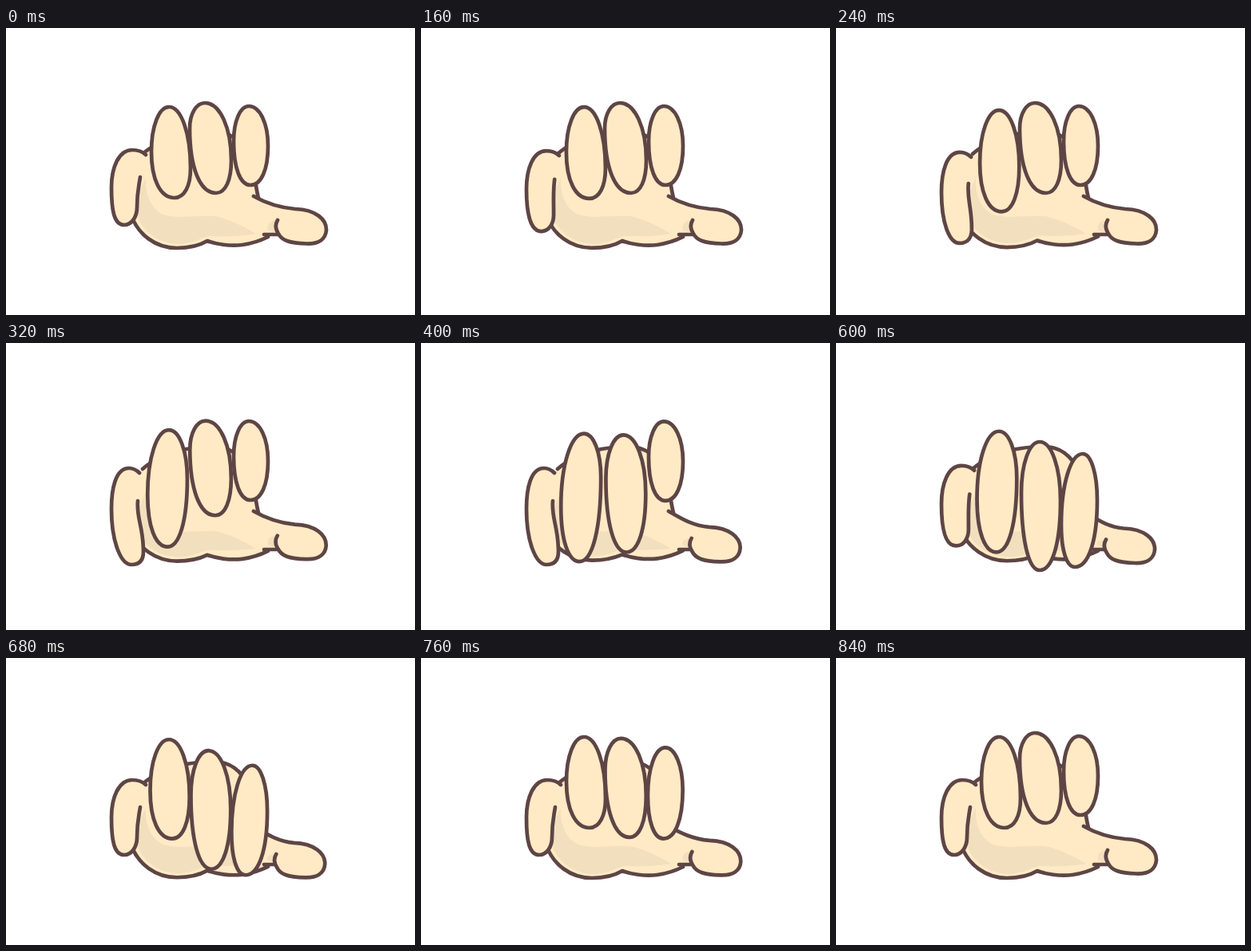
Animation of 512x360 px, one loop 880 ms. Source, as an HTML page:

```html
<!DOCTYPE html>
<html lang="en">
<head>
<meta charset="utf-8">
<title>Drumming fingers</title>
<style>
  html, body { margin: 0; width: 100%; height: 100%; overflow: hidden; background: #fff; }
  svg { display: block; width: 100vw; height: 100vh; }
  path { fill: none; stroke-width: 4.7; stroke-linecap: round; stroke-linejoin: round; }
</style>
</head>
<body>
<svg id="stage" viewBox="0 0 512 360"></svg>
<script>
const LOOP = 880, STEP = 40;
const SKIN = '#ffeac5', LINE = '#5e4545', SHADE = '#f2dfbe';

// Each finger presses and lifts once per loop, between a rest and a curled pose.
// Finger points: top, right, bottom, left.
const ring = {
  press: [140, 430], lift: [540, 740],
  rest: [204, 99, 231, 176, 211, 213, 182, 155],
  curl: [204, 114, 225, 168, 198, 276, 175, 207]
};
const middle = {
  press: [280, 466], lift: [605, 830],
  rest: [249, 94, 282, 166, 263, 207, 230, 126],
  curl: [255, 124, 281, 198, 255, 285, 232, 188]
};
const index = {
  press: [388, 592], lift: [640, 840],
  rest: [304, 98, 328, 148, 306, 197, 285, 142],
  curl: [309, 139, 327, 197, 299, 281, 282, 228]
};
// Pinky points: start, top, left, bottom, right, crease end.
const pinky = {
  press: [80, 320], lift: [450, 670],
  rest: [175, 159, 158, 153, 132, 200, 148, 247, 164, 225, 168, 187],
  curl: [167, 163, 154, 157, 132, 208, 157, 278, 172, 262, 165, 198]
};

const mix = (a, b, k) => a + (b - a) * k;
function ease(t, [from, to]) {
  const u = Math.min(1, Math.max(0, (t - from) / (to - from)));
  return u * u * (3 - 2 * u);
}
const curlAt = (f, t) => ease(t, f.press) - ease(t, f.lift);
const pose = (f, t) => f.rest.map((v, i) => mix(v, f.curl[i], curlAt(f, t)));

const svg = document.getElementById('stage');
function layer(fill, stroke) {
  const p = document.createElementNS('http://www.w3.org/2000/svg', 'path');
  p.style.fill = fill;
  p.style.stroke = stroke;
  svg.append(p);
  return d => p.setAttribute('d', d);
}

const palm = layer(SKIN, 'none');
const shade = layer(SHADE, 'none');
const palmLine = layer('none', LINE);
const thumb = layer(SKIN, 'none');
const thumbShade = layer(SHADE, 'none');
const thumbLine = layer('none', LINE);
const pinkyFill = layer(SKIN, 'none');
const pinkyLine = layer('none', LINE);
const fingers = [ring, middle, index].map(f => ({ f, draw: layer(SKIN, LINE) }));

function fingerPath([tx, ty, rx, ry, bx, by, lx, ly]) {
  const quarter = (x0, y0, x1, y1, flat, k) => flat
    ? `C${mix(x0, x1, k)} ${y0} ${x1} ${mix(y1, y0, k)} ${x1} ${y1}`
    : `C${x0} ${mix(y0, y1, k)} ${mix(x1, x0, k)} ${y1} ${x1} ${y1}`;
  return `M${tx} ${ty}` + quarter(tx, ty, rx, ry, true, 0.57) +
    quarter(rx, ry, bx, by, false, 0.61) +
    quarter(bx, by, lx, ly, true, 0.61) +
    quarter(lx, ly, tx, ty, false, 0.57) + 'Z';
}

function pinkyPath([sx, sy, tx, ty, lx, ly, bx, by, rx, ry, ex, ey]) {
  const h = ry - ey;
  return `M${sx} ${sy}C${sx - 4} ${sy - 4} ${tx + 6} ${ty} ${tx} ${ty}` +
    `C${tx - 17} ${ty} ${lx} ${ly - 25} ${lx} ${ly}` +
    `C${lx} ${mix(ly, by, 0.6)} ${bx - 13} ${by} ${bx} ${by}` +
    `C${bx + 10} ${by} ${rx} ${ry + 11} ${rx} ${ry}` +
    `C${rx} ${ry - h * 0.5} ${ex - 2} ${ey + h * 0.35} ${ex} ${ey}`;
}

const TOP = 'M171 158C182 148 199 139 226 133C242 130 262 129 274 132' +
  'C291 137 305 155 310 178C312 190 313 202 316 213';

function drawPalm(rise) {
  const low = v => v - rise, mid = v => v - rise / 2;
  const heel = `328 ${mid(262)}C322 ${mid(265)} 310 ${mid(270)} 296 ${mid(272)}` +
    `C280 ${mid(274)} 262 ${mid(271)} 252 ${mid(267)}` +
    `C242 ${low(273)} 230 ${low(276)} 214 ${low(276)}` +
    `C186 ${low(276)} 166 ${low(258)} 158 238`;
  palm(`${TOP}L340 233L343 259L${heel}L150 230L152 175Z`);
  palmLine(`${TOP}M341 259L323 259M${heel}`);
  shade(`M175 188C167 202 162 222 166 240C178 ${low(264)} 200 ${low(271)} 218 ${low(271)}` +
    `C236 ${low(270)} 244 ${low(263)} 254 ${mid(261)}C275 ${mid(262)} 296 ${mid(261)} 313 258` +
    'C296 248 280 240 262 236C240 235 220 239 200 235C182 229 174 210 175 188Z');
}

function drawThumb(drop) {
  const p = (x, y) => `${x - drop * 0.35} ${y + drop} `;
  const d = `M310 211C324 219 ${p(340, 225)}${p(362, 227)}` +
    `C${p(388, 228)}${p(401, 240)}${p(401, 253)}` +
    `C${p(400.5, 265)}${p(391, 271)}${p(376, 270.5)}` +
    `C${p(354, 270)}${p(345, 266)}${p(341, 258)}` +
    `C${p(337, 252)}${p(337, 246)}${p(340, 241)}`;
  thumb(d + 'Z');
  thumbLine(d);
  thumbShade(`M${p(339, 241)}C${p(330, 241)}${p(326, 247)}328 254L338 257Z`);
}

function draw(t) {
  drawPalm(3.5 * curlAt(ring, t));
  drawThumb(5.5 * Math.max(curlAt(middle, t), curlAt(index, t)));
  const d = pinkyPath(pose(pinky, t));
  pinkyFill(d + 'Z');
  pinkyLine(d);
  for (const { f, draw } of fingers) draw(fingerPath(pose(f, t)));
}

const start = performance.now();
function tick() {
  const t = (performance.now() - start) % LOOP;
  draw(Math.floor(t / STEP) * STEP);
  requestAnimationFrame(tick);
}
tick();
</script>
</body>
</html>
```
